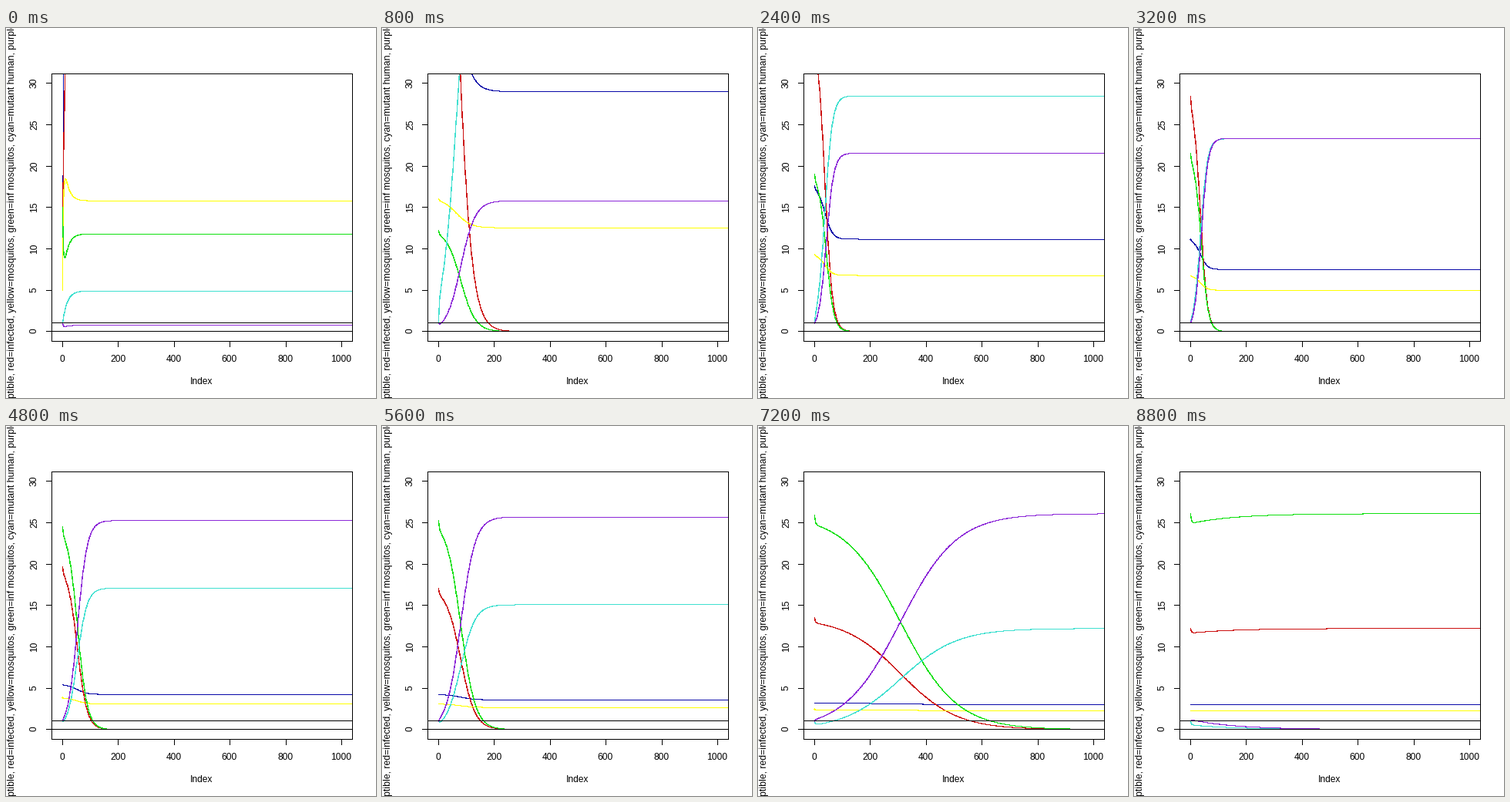
Write a matplotlib script that moves like this. It is 480 px wide and 480 px high and loops after 9600 ms.

```python
import numpy as np
import matplotlib.pyplot as plt
from matplotlib.animation import FuncAnimation
from matplotlib.patches import Rectangle

SIZE, DPI = 480, 100
PX = 72 / DPI  # one pixel in points
plt.rcParams["font.family"] = "Liberation Sans"
plt.rcParams["font.size"] = 12 * PX

LEFT, RIGHT, TOP, BOTTOM = 59, 449, 59, 406
COLORS = dict(blue="#0808a8", red="#cc1010", yellow="#ffff00",
              green="#10e010", cyan="#40e0d0", purple="#8c28d8")
LAST_STRAIN = 9
MOSQUITOS = 28.35

t = np.arange(1060)


def px(index):
    return 73.15 + .3625 * np.asarray(index)


def py(value):
    return 393.69 - 10.726 * np.asarray(value)


def settle(curve, start):
    """Let a curve begin at start and relax quickly onto its course."""
    return curve + (start - curve[0]) * np.exp(-t / 3)


def equilibrium(strain):
    """Susceptible and infected humans, healthy and infected mosquitos."""
    n = min(strain, LAST_STRAIN)
    healthy = 2.05 + 1 / (.039 + .0322 * 1.75 ** n)
    return (2.7 + 46.4 * .567 ** n, 1 / (.0117 + .0078 * n),
            healthy, MOSQUITOS - healthy)


def outbreak():
    slow, fast = np.exp(-t / 15), np.exp(-t / 3)
    return dict(blue=np.minimum(11 * np.exp(.275 * t), 99),
                red=np.minimum(15 * np.exp(.095 * t), 99),
                yellow=15.8 + 6.5 * slow - 17.3 * fast,
                green=11.8 - 6 * slow + 9.2 * fast,
                cyan=4.9 - 3.9 * np.exp(-t / 16),
                purple=.75 - .35 * slow + .6 * fast)


def invasion(strain):
    """A mutant replaces the resident along a logistic curve, or dies out."""
    rate = .1143 / (1 + (strain - 4) ** 2 / 15.6) - .034
    lead = 28 * .57 ** strain
    vectors = 1 / (1 + np.exp(3.05 - rate * t))
    humans = 1 / (1 + np.exp(3.05 - rate * (t + lead)))
    s0, i0, m0, v0 = equilibrium(strain - 1)
    s1, i1, m1, v1 = equilibrium(strain)
    return dict(blue=settle(s0 + (s1 - s0) * humans, s0),
                red=settle(i0 * (1 - humans), i0),
                yellow=settle(m0 + (m1 - m0) * humans, m0),
                green=settle(v0 * (1 - vectors), v0),
                cyan=settle(i1 * humans, 1),
                purple=settle(v1 * vectors, 1))


fig = plt.figure(figsize=(SIZE / DPI, SIZE / DPI), dpi=DPI, facecolor="white")
ax = fig.add_axes([0, 0, 1, 1])
ax.set(xlim=(0, SIZE), ylim=(SIZE, 0))
ax.axis("off")


def rule(xs, ys):
    """Black line through pixel centres, given by whole pixel numbers."""
    ax.plot(np.add(xs, .5), np.add(ys, .5), color="black", lw=PX, aa=False,
            snap=False, zorder=5, solid_capstyle="projecting")


def label(x, y, text, **style):
    ax.text(x, y, text, **{"ha": "center", "va": "baseline", **style})


rule([LEFT, RIGHT, RIGHT, LEFT, LEFT], [TOP, TOP, BOTTOM, BOTTOM, TOP])
for level in (0, 1):
    rule([LEFT, RIGHT], [np.floor(py(level))] * 2)
for tick in range(0, 1001, 200):
    x = np.floor(px(tick))
    rule([x, x], [BOTTOM, BOTTOM + 7])
    label(x, 433, str(tick))
for tick in range(0, 31, 5):
    y = np.floor(py(tick))
    rule([LEFT - 7, LEFT], [y, y])
    label(43, y, str(tick), rotation=90, ha="right", va="center")
label(254, 462, "Index")
label(14.5, 480.5, "ptible, red=infected, yellow=mosquitos, "
      "green=inf mosquitos, cyan=mutant human, purple=mutant mosquitos",
      rotation=90, ha="right", va="bottom", fontsize=12.2 * PX)

frame = Rectangle((LEFT, TOP), RIGHT - LEFT, BOTTOM - TOP,
                  transform=ax.transData)
lines = {}
for name, color in COLORS.items():
    lines[name], = ax.plot([], [], color=color, lw=.9 * PX, aa=False,
                           snap=False, solid_joinstyle="bevel")
    lines[name].set_clip_path(frame)


def draw(step):
    curves = invasion(step) if step else outbreak()
    for name, values in curves.items():
        lines[name].set_data(np.floor(px(t + 1)) + .5,
                             np.floor(py(values)) + .5)
    return list(lines.values())


anim = FuncAnimation(fig, draw, frames=12, interval=800, repeat=True,
                     repeat_delay=0, blit=False)
plt.show()
```
